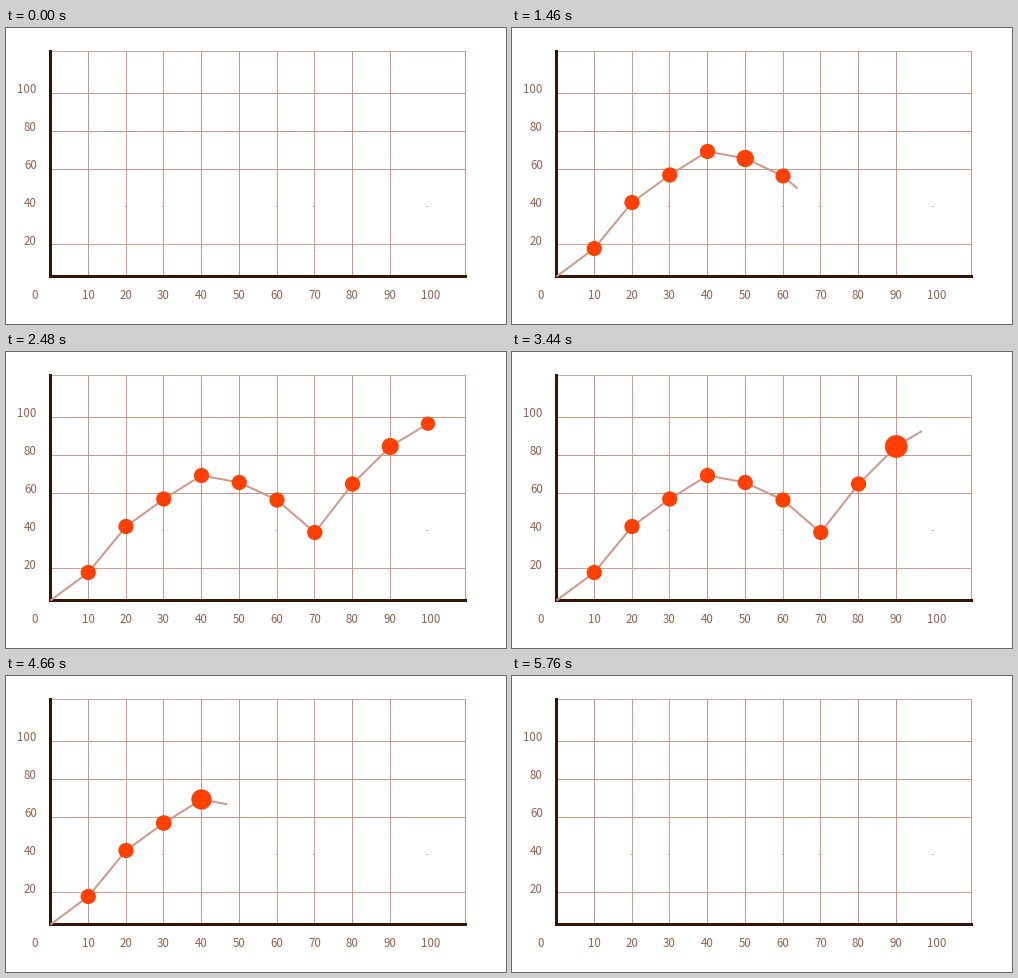
A matplotlib script for the animation above (6.02 s loop, 500 by 296 pixels).

```python
import numpy as np
import matplotlib.pyplot as plt
from matplotlib.animation import FuncAnimation
from matplotlib.patches import Circle, Rectangle

W, H, DPI = 500, 296, 100
PX = 72 / DPI
STEP, LOOP = 20, 6020
DRAW, END, BACK = 2390, 2760, 5760   # line done, last dot settled, all undone
POP, PEAK = 360, 144                 # dot pop length and its high point
R, R_MAX = 7.6, 11.4

AXIS, GRID, SHADE, EDGE = "#351505", "#d99b8d", "#c9978a", "#c9a79d"
TEXT, LINE, DOT = "#93614f", "#d0988a", "#ff4000"

xs = 44.5 + 37.75 * np.arange(11)
ys = np.array([248.5, 220.5, 174.5, 147, 123.5, 130.5, 148, 180.5, 132, 94.5, 71.7])
dist = np.concatenate([[0], np.cumsum(np.hypot(np.diff(xs), np.diff(ys)))])
hits = dist / dist[-1] * DRAW

fig = plt.figure(figsize=(W / DPI, H / DPI), dpi=DPI, facecolor="white")
ax = fig.add_axes([0, 0, 1, 1])
ax.set_xlim(0, W)
ax.set_ylim(H, 0)
ax.axis("off")


def bar(x, y, w, h, color, z=1):
    ax.add_patch(Rectangle((x, y), w, h, facecolor=color, lw=0, zorder=z))


def label(x, y, text, ha):
    ax.text(x, y, text, ha=ha, va="baseline", color=TEXT,
            family="Noto Sans CJK JP", size=11.5 * PX)


# grid
for y, color in ((23, EDGE), (65, SHADE), (103, SHADE), (141, SHADE), (216, GRID)):
    bar(45, y, 415, 1, color)
for x in (120, 157, 271, 308):
    bar(x, 23, 1, 224, GRID)
for x in (82, 195, 233, 346, 384, 459):
    bar(x, 23, 1, 224, SHADE)
for x in (120, 157, 271, 308, 421):
    bar(x - 1, 178, 2, 1, SHADE)

# axes
bar(43, 22, 3, 227, AXIS, 2)
bar(43, 247, 418, 3, AXIS, 2)

# labels
for i in range(1, 6):
    label(30.8, 254.4 - 37.8 * i, str(20 * i), "right")
label(28.8, 270.8, "0", "center")
for i in range(1, 11):
    label(xs[i] - 0.2 + 2.7 * (i == 10), 270.8, str(10 * i), "center")

line, = ax.plot([], [], color=LINE, lw=2 * PX, zorder=3,
                solid_joinstyle="round", solid_capstyle="butt")
dots = [ax.add_patch(Circle(p, 0, facecolor=DOT, lw=0, zorder=4))
        for p in zip(xs[1:], ys[1:])]


def update(frame):
    t = frame * STEP
    u = min(t, END, max(BACK - t, 0))
    s = min(u / DRAW, 1) * dist[-1]
    done = dist < s
    line.set_data(np.append(xs[done], np.interp(s, dist, xs)),
                  np.append(ys[done], np.interp(s, dist, ys)))
    line.set_visible(u > 0)
    for dot, hit in zip(dots, hits[1:]):
        r = np.interp(u - hit, [0, PEAK, POP], [0, R_MAX, R])
        dot.set_radius(r)
        dot.set_visible(r > 0)
    return [line, *dots]


anim = FuncAnimation(fig, update, frames=LOOP // STEP, interval=STEP,
                     repeat=True, repeat_delay=0, blit=False)
plt.show()
```
